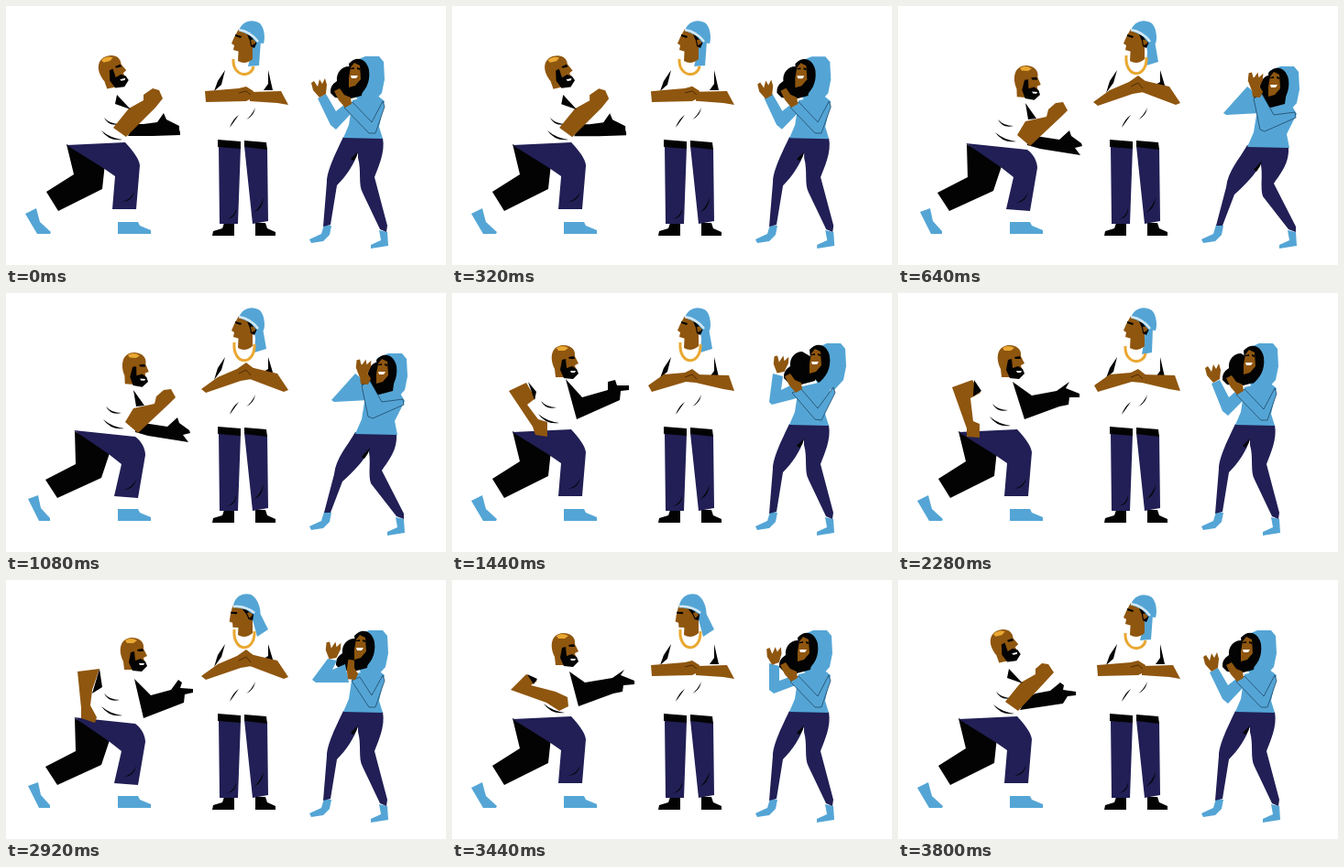
Recreate the animation shown at these times as an HTML page. Size 480 px wide and 283 px high, loop 3.84 s.

```html
<!DOCTYPE html>
<html lang="en">
<head>
<meta charset="utf-8">
<title>Three dancers</title>
<style>
html, body { margin: 0; width: 100%; height: 100%; overflow: hidden; background: #fff; }
svg { display: block; width: 480px; height: 283px; }
</style>
</head>
<body>
<svg id="stage" viewBox="0 0 480 283"></svg>
<script>
const NS = 'http://www.w3.org/2000/svg';
const LOOP = 3840;
const BLUE = '#54a5d5', NAVY = '#211f55', SKIN = '#8f560f', GOLD = '#e9a832', BLACK = '#030303', WHITE = '#fff';
const stage = document.getElementById('stage');
const moving = [];

// Start and end of each move from one pose to the next; seven poses per loop.
const moves = [[300, 610], [1110, 1410], [1500, 2240], [2300, 2600], [3030, 3350], [3460, 3770], [3800, 3840]];

function add(parent, tag, attrs) {
  const node = document.createElementNS(NS, tag);
  for (const k in attrs) node.setAttribute(k, attrs[k]);
  return parent.appendChild(node);
}

// `order` picks one of `list` for each of the seven poses.
function animate(node, attr, list, order = '0123456') {
  const poses = [...order].map(i => list[i]);
  node.setAttribute(attr, poses[0]);
  moving.push({ node, attr, poses });
}

function still(fill, d, parent = stage) {
  return add(parent, 'path', { fill, d });
}

function morph(fill, list, order, parent = stage) {
  const node = add(parent, 'path', { fill });
  animate(node, 'd', list.map(d => 'M' + d + (fill === 'none' ? '' : 'Z')), order);
  return node;
}

function stroke(node, color, width) {
  node.setAttribute('fill', 'none');
  node.setAttribute('stroke', color);
  node.setAttribute('stroke-width', width);
}

function group(list, order) {
  const g = add(stage, 'g', {});
  animate(g, 'transform', list.map(([x, y, r = 0, cx = 0, cy = 0]) => `translate(${x} ${y}) rotate(${r} ${cx} ${cy})`), order);
  return g;
}

function mix(a, b, f) {
  const end = b.match(/-?[\d.]+/g);
  let i = 0;
  return a.replace(/-?[\d.]+/g, n => +(+n + (end[i++] - n) * f).toFixed(2));
}

const BEAT = '0100100';

function leftMan() {
  morph(BLUE, ['21 227 33 221 37 236 49 247 48 249 34 249', '24 225 35 221 38 235 48 246 48 249 36 249'], BEAT);
  still(BLUE, 'M122 236H144L146 240 158 245V249H122Z');
  morph(BLACK, ['66 151 108 172 105 200 57 224 44 203 74 184', '75 151 114 172 104 202 56 224 43 204 76 187'], BEAT);
  morph(NAVY, [
    '66 152 130 149C138 158 145 166 146 174L142 222 116 222 119 186 106 177',
    '74 150 141 157C148 162 152 170 152 177L144 224 118 222 126 187 112 176'], BEAT);
  morph(BLACK, ['127 214Q137 211 140 202Q138 213 127 214', '129 215Q139 212 142 203Q140 214 129 215'], BEAT);
  // far arm
  morph(BLACK, [
    '140 129 150 129 165 127 172 117 175 124 189 131 189 135 190 138 190 141 160 142 133 142',
    '141 140 150 142 176 146 187 136 189 142 200 150 201 153 193 155 199 163 155 156 141 152',
    '124 94 142 114 170 106 170 97 178 95 180 101 193 101 193 106 184 107 183 117 136 138',
    '125 97 146 112 173 107 187 97 183 104 198 110 198 114 187 114 186 122 176 124 138 138',
    '140 108 158 126 180 120 188 109 192 112 190 118 204 119 204 123 195 125 194 134 150 151',
    '128 100 145 112 175 107 188 98 184 104 199 110 199 114 187 115 186 122 176 124 138 138',
    '140 129 150 124 166 121 177 112 181 115 180 120 194 122 194 126 185 127 180 135 133 142']);
  // shirt folds
  const folds = group([[0, 0], [2, 2], [-10, -4], [-4, -1], [0, 2]], '0123430');
  still(BLACK, 'M104 136Q113 144 127 146Q112 148 104 136Z', folds);
  still(BLACK, 'M107 122Q113 129 124 129Q112 132 107 122Z', folds);
  // near arm
  morph(SKIN, [
    '134 112 117 133 131 143 163 111 171 101 167 92 160 90 150 97 150 103',
    '139 126 130 141 144 153 178 121 185 114 180 105 172 106 164 113 162 121',
    '91 115 81 98 62 107 88 146 91 155 104 157 104 141 94 138 82 122',
    '90 109 81 95 59 103 75 148 75 157 89 158 89 143 82 140 79 115',
    '94 120 102 97 78 100 82 140 82 151 97 156 99 150 92 137 94 121',
    '93 110 81 103 64 120 103 134 117 143 127 138 126 128 113 122 86 115',
    '134 112 117 133 131 143 159 113 170 101 164 92 157 91 150 97 150 103']);
  morph(BLACK, ['121 97 136 113 119 107', '139 106 151 123 142 124', '83 97 92 108 90 117', '83 95 91 107 82 113',
    '102 97 105 117 94 124', '82 103 93 108 89 114'], '0123450');
  const head = group([[-7, -3, -13, 122, 74], [18, 8, 4, 122, 74], [0, 0, 0, 122, 74], [16, 6, 0, 122, 74], [0, 1, 0, 122, 74]], '0122340');
  still(SKIN, 'M112 83C106 71 108 58 121 57C131 57 135 63 134 69L138 77 134 79 136 86 126 92 113 92Z', head);
  still(GOLD, 'M114 60Q120 56 127 60L123 63 116 63Z', head);
  still(BLACK, 'M120 73L124 72 125 82 131 80 136 83 138 88 132 94 122 93 118 84Z', head);
  still(BLACK, 'M127 70L133 69 134 72 128 72Z', head);
  still(WHITE, 'M129 85L135 85 134 87 130 87Z', head);
}

function middleMan() {
  still(BLACK, 'M225 251L226 246 236 243 238 237H249V251ZM272 251V237H283L285 243 294 247V251Z');
  still(NAVY, 'M232 153L256 154 253 238H233ZM260 153L285 155 286 235 269 238Z');
  still(BLACK, 'M231 146L256 148V156L231 154ZM260 147L284 149 285 157 260 154Z');
  still(BLACK, 'M240 233Q249 231 251 221Q251 232 240 233ZM270 226Q278 220 281 209Q280 222 270 226Z');
  still(BLACK, 'M244 133Q247 124 254 119Q249 126 244 133ZM262 124Q268 120 272 111Q270 121 262 124Z');
  // sleeves
  morph(BLACK, ['239 70 235 86 227 93 231 82', '239 70 235 84 227 95 231 82'], BEAT);
  morph(BLACK, ['286 70 291 92 281 92 286 85', '286 70 292 90 281 86 286 83'], BEAT);
  // folded arms
  const pick = '0122100';
  morph(SKIN, [
    '266 94 300 93 308 108 296 106 266 104',
    '266 81 296 88 308 106 303 108 266 94',
    '266 89 302 90 308 107 296 105 266 98'], pick);
  morph(SKIN, [
    '217 93 230 92 254 90 262 88 270 93 268 101 262 104 218 105',
    '213 105 231 92 252 83 262 76 271 83 268 94 256 96 218 109',
    '214 101 231 89 254 87 262 83 271 90 266 98 255 97 218 108'], pick);
  const knuckle = morph('none', ['254 95 262 93 267 97', '254 88 262 84 267 90', '254 92 262 89 267 94'], pick);
  stroke(knuckle, '#4d2c06', 1);
  // head
  morph(BLUE, ['270 34 278 38 276 65 264 66 268 50', '270 34 280 38 284 61 271 65 272 50',
    '270 34 278 38 277 65 266 67 269 50', '266 34 277 36 286 54 274 62 270 47'], '0112330');
  still(SKIN, 'M254 42L269 40 269 58Q261 65 253 60Z');
  const head = group([[0, 0, 0, 262, 52], [0, 0, -15, 262, 52]], '0000110');
  still(SKIN, 'M254 25L249 34 246 41 249 43 248 48 255 50 267 47 275 38Z', head);
  still(BLACK, 'M263 31L275 37 271 46 267 44 266 38ZM250 31L257 33 256 35 250 33Z', head);
  still(SKIN, 'M267 37Q273 35 272 41L268 43Z', head);
  still(BLUE, 'M254 27C257 17 268 13 277 19C282 24 283 35 281 41L273 40 266 32Z', head);
  stroke(still('none', 'M254 26Q267 28 275 39', head), '#d3e8f5', 2.5);
  const chain = morph('none', ['248 58C247 78 268 79 270 66', '249 54C247 80 272 80 271 56'], '0110110');
  stroke(chain, GOLD, 3);
}

function woman() {
  const STEP = '0100000';
  // legs and feet
  still(BLUE, 'M347 239L355 240 353 250 346 257 333 259 331 255 344 249Z');
  const foot = group([[0, 0], [18, 0]], STEP);
  still(BLUE, 'M407 245L416 247 417 262 398 265 398 261 409 256Z', foot);
  morph(NAVY, [
    '368 143 411 144C414 160 406 176 402 187L416 240 415 247 408 244 389 204C384 195 388 180 384 166L384 160C380 172 372 185 361 196L354 239 346 241 350 192C350 180 360 160 368 143',
    '381 152 426 154C427 172 418 182 410 194L434 241 434 247 426 244 398 208C395 198 398 186 396 174L396 172C390 184 378 196 367 206L354 240 347 240 358 198C360 180 372 168 381 152'], STEP);
  morph(BLACK, ['376 167 384 159 382 165 379 169', '388 179 397 169 395 175 391 181'], STEP);
  // hood, torso
  const hood = group([[0, 0], [25, 11], [17, 0], [2, 0], [4, 0]], '0123430');
  still(BLUE, 'M380 60L392 55 407 55 412 61 413 80 410 95 400 106 384 103 378 92Z', hood);
  morph(BLUE, [
    '378 103 404 97 413 104 407 132 411 145 368 144 374 130',
    '392 113 428 106 435 118 424 140 427 155 381 154 388 138'], STEP);
  // hair, face
  const hair = group([[0, 0], [34, 9], [8, -2], [0, 0], [6, -2], [3, 0]], '0123450');
  still(BLACK, 'M374 66C366 66 360 73 361 82Q353 87 354 95L359 100 373 102 388 98 391 76Z', hair);
  const face = group([[0, 0], [30, 10], [16, -1], [3, 0], [6, -2]], '0123430');
  still(BLACK, 'M374 63C382 54 393 57 396 70C398 84 391 94 384 99L377 92Z', face);
  still(SKIN, 'M376 67L380 62 386 65 387 80 381 87 374 89 374 78Z', face);
  still(WHITE, 'M376 76L384 76 382 79 377 79Z', face);
  still(BLACK, 'M376 68L380 67 380 69 376 69ZM383 67L386 68 386 70 383 69Z', face);
  // far arm
  morph(BLUE, [
    '340 101 349 96 360 115 370 107 376 118 360 135 354 130',
    '381 88 390 95 388 100 392 104 396 117 358 119 355 117',
    '350 88 361 91 359 106 371 100 376 115 349 122 346 119',
    '342 99 351 95 361 114 370 106 376 118 360 134 354 129',
    '351 86 361 88 356 98 370 92 374 112 338 112 334 109',
    '346 91 357 94 357 110 371 105 375 115 351 124 346 120'], '0123450');
  const farHand = group([[0, 0], [47, -8, 20, 342, 90], [16, -12, 20, 342, 90], [2, -2, 0, 342, 90], [14, -13, 20, 342, 90], [9, -7, 10, 342, 90]], '0123450');
  still(SKIN, 'M333 84L336 82 340 88 342 80 345 85 348 79 350 86 349 96 342 100 335 92Z', farHand);
  // near arm
  const sleeve = [
    '369 111 378 105 399 127 411 104 413 110 403 139 396 139',
    '388 101 397 96 410 119 433 116 434 122 400 137 395 135',
    '371 109 381 105 399 126 416 103 418 109 403 139 396 138',
    '377 110 386 106 399 126 411 104 413 110 403 139 396 139'];
  const pick = '0120300';
  stroke(morph(BLUE, sleeve, pick), '#173a58', .7);
  moving[moving.length - 1].node.setAttribute('fill', BLUE);
  const nearHand = group([[0, 0, 0, 368, 101], [23, -11, 35, 368, 101], [5, -2, 0, 368, 101], [9, -2, 35, 368, 101]], pick);
  still(SKIN, 'M358 93L364 90 369 97 376 100 377 107 370 111 363 103Z', nearHand);
}

function draw(now) {
  const t = now % LOOP;
  let i = moves.findIndex(m => t < m[1]);
  const [start, end] = moves[i];
  const u = Math.max(0, (t - start) / (end - start));
  const f = u * u * (3 - 2 * u);
  for (const { node, attr, poses } of moving) {
    const a = poses[i], b = poses[(i + 1) % poses.length];
    node.setAttribute(attr, a === b || !f ? a : mix(a, b, f));
  }
  requestAnimationFrame(() => draw(performance.now()));
}

leftMan();
middleMan();
woman();
draw(performance.now());
</script>
</body>
</html>
```
